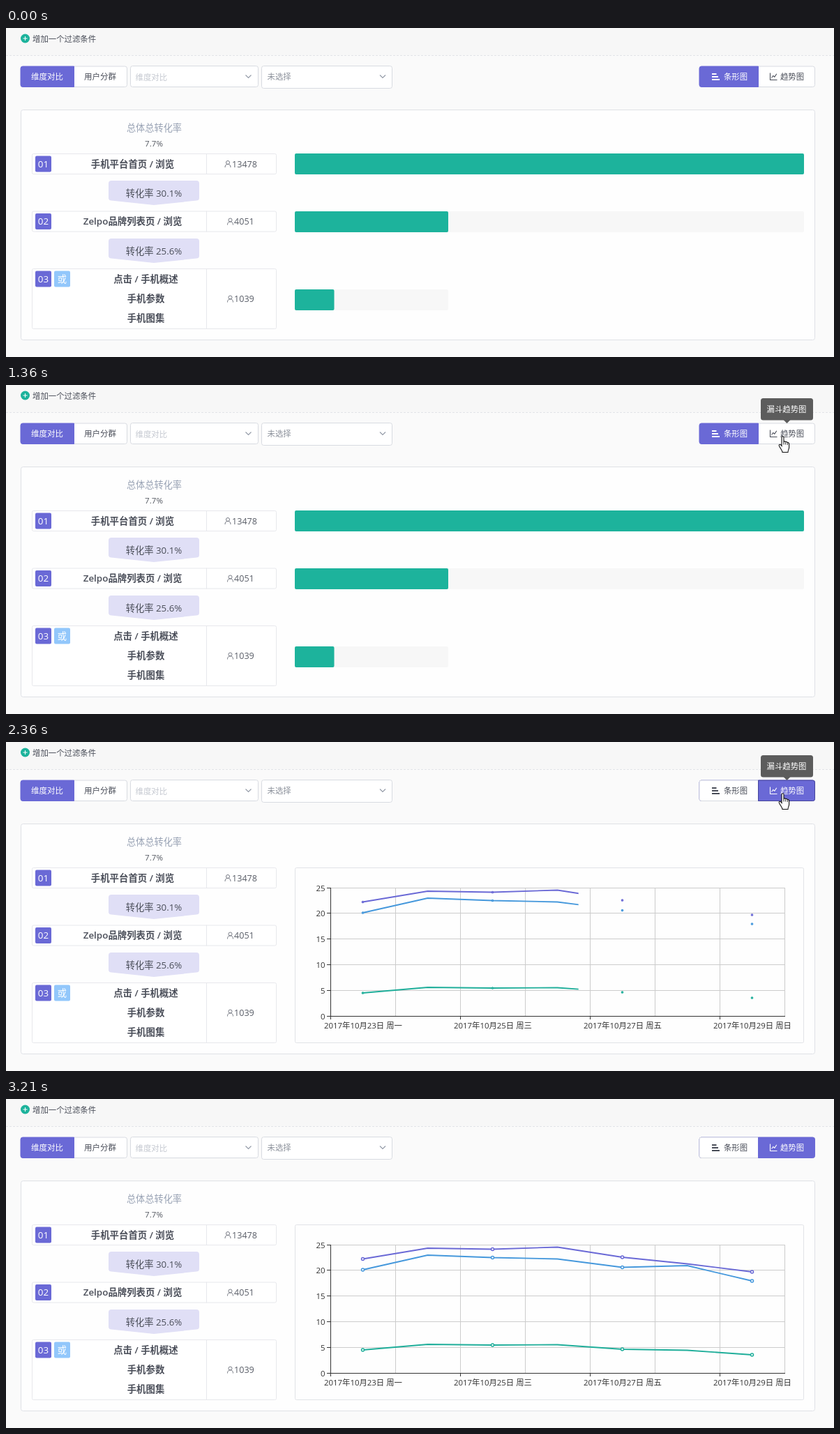
These frames come from a looping animation (1187 by 472 pixels, 3.76 s). An HTML page:

```html
<!DOCTYPE html>
<html lang="zh-CN">
<head>
<meta charset="utf-8">
<title>漏斗趋势图</title>
<style>
  html, body { margin: 0; width: 100%; height: 100%; overflow: hidden; background: #fafafa; }
  svg { display: block; font-family: "Open Sans", "Noto Sans CJK SC", "Noto Sans CJK", sans-serif; }
  text { white-space: pre; }
</style>
</head>
<body>
<svg id="stage" width="1187" height="472" viewBox="0 0 1187 472"></svg>
<script>
const LOOP = 3760;
const PURPLE = '#6a69d6', TEAL = '#1db39c', INK = '#4a4e59', EDGE = '#d8dbe1', SOFT = '#e7e8ec';
const stage = document.getElementById('stage');

// Markup helpers
const rect = (x, y, w, h, fill, r = 0, stroke = 'none') =>
  `<rect x="${x}" y="${y}" width="${w}" height="${h}" rx="${r}" fill="${fill}" stroke="${stroke}"/>`;
const box = (x, y, w, h, r = 3, stroke = EDGE, fill = '#fff') => rect(x + .5, y + .5, w - 1, h - 1, fill, r, stroke);
const path = (d, stroke, width = 1, fill = 'none') =>
  `<path d="${d}" stroke="${stroke}" stroke-width="${width}" fill="${fill}"/>`;
const text = (x, cy, size, str, fill = INK, anchor = 'middle', weight = 400) =>
  `<text x="${x}" y="${cy + size * .37}" font-size="${size}" fill="${fill}" text-anchor="${anchor}" font-weight="${weight}">${str}</text>`;
const group = (id, body, extra = '') => `<g id="${id}" ${extra}>${body}</g>`;

// Button halves with rounded outer corners
const leftHalf = (x, y, w, h, fill, stroke) =>
  path(`M${x + w} ${y}H${x + 3}q-3 0 -3 3v${h - 6}q0 3 3 3H${x + w}Z`, stroke, 1, fill);
const rightHalf = (x, y, w, h, fill, stroke) =>
  path(`M${x} ${y}h${w - 3}q3 0 3 3v${h - 6}q0 3 -3 3H${x}Z`, stroke, 1, fill);

const chevron = (x, y) => path(`M${x - 4} ${y - 2}l4 4l4 -4`, '#9299a6', 1.1);
const barIcon = c => rect(1012, 65, 6.5, 2, c) + rect(1012, 69, 9, 2, c) + rect(1012, 73, 11, 2, c);
const lineIcon = c => path('M1095.5 64.5V74.5H1105.5M1097.5 71.5l2.3 -3l2 1.6l3 -4.3', c, 1.1);

function toggle(trend) {
  const [a, b] = trend ? [INK, '#fff'] : ['#fff', INK];
  const left = leftHalf(994, 55, 84.5, 29.5, trend ? '#fff' : PURPLE, trend ? EDGE : PURPLE);
  const right = rightHalf(1078.5, 55, 81, 29.5, trend ? PURPLE : '#fff', trend ? PURPLE : EDGE);
  return (trend ? left + right : right + left) + barIcon(a) + lineIcon(b) +
    text(1046, 70, 11.4, '条形图', a) + text(1127, 70, 11.4, '趋势图', b);
}

function person(x, y) {
  return `<circle cx="${x}" cy="${y - 2}" r="2.5" fill="none" stroke="#777b85"/>` +
    path(`M${x - 4} ${y + 5}q0 -4.6 4 -4.6t4 4.6`, '#777b85');
}

function step(y, h, num, lines, cx, count) {
  const cy = y + h / 2, wide = count.length > 4;
  return box(37, y, 351, h, 2, SOFT) + path(`M287.5 ${y}v${h}`, SOFT) +
    rect(42, y + 3.5, 23, 23, PURPLE, 2) + text(53.5, y + 15, 13.4, num, '#fff') +
    lines.map((s, i) => text(cx, y + 15 + i * 28, 13.4, s, INK, 'middle', 600)).join('') +
    person(wide ? 318 : 321.5, cy) + text(wide ? 324 : 327, cy, 12.6, count, '#5a5e68', 'start');
}

const rate = (y, s) =>
  path(`M151 ${y}H273q4 0 4 4V${y + 25}q0 3 -4 3.6L212 ${y + 35}L151 ${y + 28.6}q-4 -.6 -4 -3.6V${y + 4}q0 -4 4 -4Z`, 'none', 0, '#e0dff6') +
  text(212, y + 18, 13.3, s);

const page =
  rect(0, 0, 1187, 472, '#fafafa') + rect(0, 0, 1187, 39, '#f7f7f7') +
  `<path d="M0 39.5H1187" stroke="#e2e4e8" stroke-dasharray="3 2"/>` +
  `<circle cx="27.5" cy="15" r="6.5" fill="${TEAL}"/>` + path('M24.5 15h6M27.5 12v6', '#fff') +
  text(38, 15.5, 11.4, '增加一个过滤条件', INK, 'start') +
  rightHalf(97.5, 55, 76, 29.5, '#fff', EDGE) + leftHalf(21, 55, 76.5, 29.5, PURPLE, PURPLE) +
  text(59, 70, 11.5, '维度对比', '#fff') + text(135, 70, 11.5, '用户分群') +
  box(178, 54, 184, 31) + text(185.5, 70.5, 11.4, '维度对比', '#c4c8d0', 'start') + chevron(347.5, 69.5) +
  box(366, 54, 188, 33) + text(374.5, 70, 11.4, '未选择', '#8d929c', 'start') + chevron(540, 69.5) +
  box(21, 117, 1139, 331, 3, '#dfe1e6', '#fefefe') +
  text(212.5, 143, 13.2, '总体总转化率', '#97a1b3') + text(212, 166, 11.6, '7.7%', '#555962') +
  step(180, 30, '01', ['手机平台首页 / 浏览'], 181.5, '13478') +
  rate(219, '转化率 30.1%') +
  step(262.5, 30, '02', ['Zelpo品牌列表页 / 浏览'], 181.5, '4051') +
  rate(302, '转化率 25.6%') +
  step(345, 87, '03', ['点击 / 手机概述', '手机参数', '手机图集'], 200.5, '1039') +
  rect(69, 348.5, 23, 23, '#92c7fb', 2) + text(80.5, 360.5, 13.3, '或', '#fff');

const bars =
  rect(414, 180, 730, 30, TEAL, 2) +
  rect(414, 263, 730, 30, '#f7f7f7', 2) + rect(414, 263, 220, 30, TEAL, 2) +
  rect(414, 375, 220, 30, '#f7f7f7', 2) + rect(414, 375, 56.5, 30, TEAL, 2);

// Trend chart
const X0 = 465.5, COL = 93, Y0 = 393.5, ROW = 36.9;
const series = [
  ['#6a69d6', [229.5, 214, 215.5, 212.5, 227, 236.5, 248]],
  ['#4598dc', [245, 224, 227.5, 229.5, 241.5, 239, 261]],
  ['#1fae9a', [360, 352, 353, 352.5, 359, 360.5, 367]]
];
const days = ['23日 周一', '25日 周三', '27日 周五', '29日 周日'];
const dayX = i => 511.5 + COL * i;

function chart() {
  let grid = '', ticks = '', labels = '', lines = '', dots = '';
  for (let i = 1; i <= 7; i++) grid += `M${Math.min(X0 + COL * i, 1116.5)} 209V393`;
  for (let i = 0; i <= 5; i++) {
    const y = Math.round(Y0 - ROW * i - .5) + .5;
    if (i) grid += `M465 ${y}H1116`;
    ticks += `M460 ${y}h5`;
    labels += text(457.5, y, 11.4, i * 5, '#333', 'end');
  }
  days.forEach((d, i) => {
    ticks += `M${X0 + COL * 2 * i} 393v5`;
    labels += text(dayX(i * 2) + .5, 406.5, 11.4, '2017年10月' + d, '#333');
  });
  for (const [color, ys] of series) {
    lines += path('M' + ys.map((y, i) => `${dayX(i)} ${y}`).join('L'), color, 1.8);
    ys.forEach((y, i) => {
      if (i % 2 === 0) dots += `<circle class="dot" cx="${dayX(i)}" cy="${y}" fill="#fff" stroke="${color}" stroke-width="1.5"/>`;
    });
  }
  return box(414, 180, 730, 252, 2, '#e1e3e7', '#fefefe') + path(grid, '#ccc') +
    path(ticks + 'M465.5 209V394M465 393.5H1117', '#333') + labels +
    `<clipPath id="clip"><rect id="reveal" x="465" y="200" width="0" height="200"/></clipPath>` +
    `<g clip-path="url(#clip)" stroke-linejoin="bevel">${lines}</g>` + group('dots', dots);
}

const tip = rect(1082, 19, 75, 31.5, '#5c5c5c', 3.5) + path('M1114.5 50h10l-5 5Z', 'none', 0, '#5c5c5c') +
  text(1119, 35, 11.4, '漏斗趋势图', '#fff', 'middle', 500);
const arrow = path('M.5 .5V16L4 12.8L6.4 18L8.7 17L6.4 11.8H11Z', '#111', 1, '#fff');
const hand = path('M-1 1.2C-1 -.8 2 -.8 2 1.2V8C2 6.4 4.6 6.5 4.7 8.2C5 7 7.3 7.3 7.3 9.2C7.8 8.2 9.6 8.6 9.6 10.5V15.5C9.6 18 8 19 8 22.5H0C0 20 -2 18.5 -4.6 13.5C-5.5 11.5 -3.5 10.3 -2 12.2L-1 13.5Z', '#111', 1.1, '#fff') +
  path('M2 8v3.5M4.7 8.5v3M7.3 9.5v2.5', '#111', .9);

stage.innerHTML = page + group('bars', bars) + group('chart', chart()) + toggle(false) +
  group('active', toggle(true)) + group('focus', rightHalf(1078.5, 55, 81, 29.5, 'none', '#46459c')) +
  group('tip', tip) + group('arrow', arrow) + group('hand', hand);

const el = {};
stage.querySelectorAll('[id]').forEach(n => el[n.id] = n);
const dots = stage.querySelectorAll('.dot');

const clamp = v => Math.max(0, Math.min(1, v));
const mix = (a, b, k) => a + (b - a) * k;
const easeOut = (k, n) => 1 - (1 - clamp(k)) ** n;
const show = (node, on) => node.setAttribute('visibility', on ? 'visible' : 'hidden');

// The screen refreshes in evenly spaced bursts: start, end, count
const bursts = [[200, 670, 7], [750, 1210, 7], [1290, 1360, 2], [1820, 2290, 7], [2360, 2820, 7], [2900, 3210, 5]];
const ticks = bursts.flatMap(([a, b, n]) =>
  Array.from({ length: n }, (_, i) => Math.floor(mix(a, b, i / (n - 1)) / 10) * 10));
const hold = t => ticks.reduce((last, v) => v <= t ? v : last, 0);

function pointer(t) {
  if (t < 200 || t >= 3210) return null;
  if (t < 750) {
    const k = easeOut((t - 200) / 470, 1.5), q = 1 - k;
    return [q * q * 1127 + 2 * q * k * 1215 + k * k * 1168, q * q * 460 + 2 * q * k * 230 + k * k * 84];
  }
  if (t < 2820) {
    const k = easeOut((t - 750) / 460, 1.8);
    return [mix(1163, 1113, k), mix(77, 74, k)];
  }
  const k = clamp((t - 2820) / 390) ** 1.5;
  return [mix(1114, 1200, k), mix(74, 82, k)];
}

function draw(t) {
  const trend = t >= 1820, started = t > 1820;
  show(el.bars, !trend);
  show(el.chart, trend);
  el.reveal.setAttribute('width', started ? Math.min(651, 46 + .56 * (t - 1807)) : 0);
  const grow = clamp((t - 1725) / 1163);
  show(el.dots, started);
  dots.forEach(d => d.setAttribute('r', 2 * grow));
  el.active.setAttribute('opacity', clamp((t - 1820) / 200));
  show(el.focus, t >= 1970 && t < 3050);
  el.tip.setAttribute('opacity', t < 1290 ? 0 : t < 1360 ? .5 : t < 3050 ? 1 : t < 3130 ? .5 : 0);

  const p = pointer(t), over = p && p[0] < 1160 && p[1] < 85;
  show(el.arrow, p && !over);
  show(el.hand, over);
  if (p) (over ? el.hand : el.arrow).setAttribute('transform', `translate(${p.map(Math.round)})`);
}

function frame() {
  draw(hold(performance.now() % LOOP));
  requestAnimationFrame(frame);
}
frame();
</script>
</body>
</html>
```
